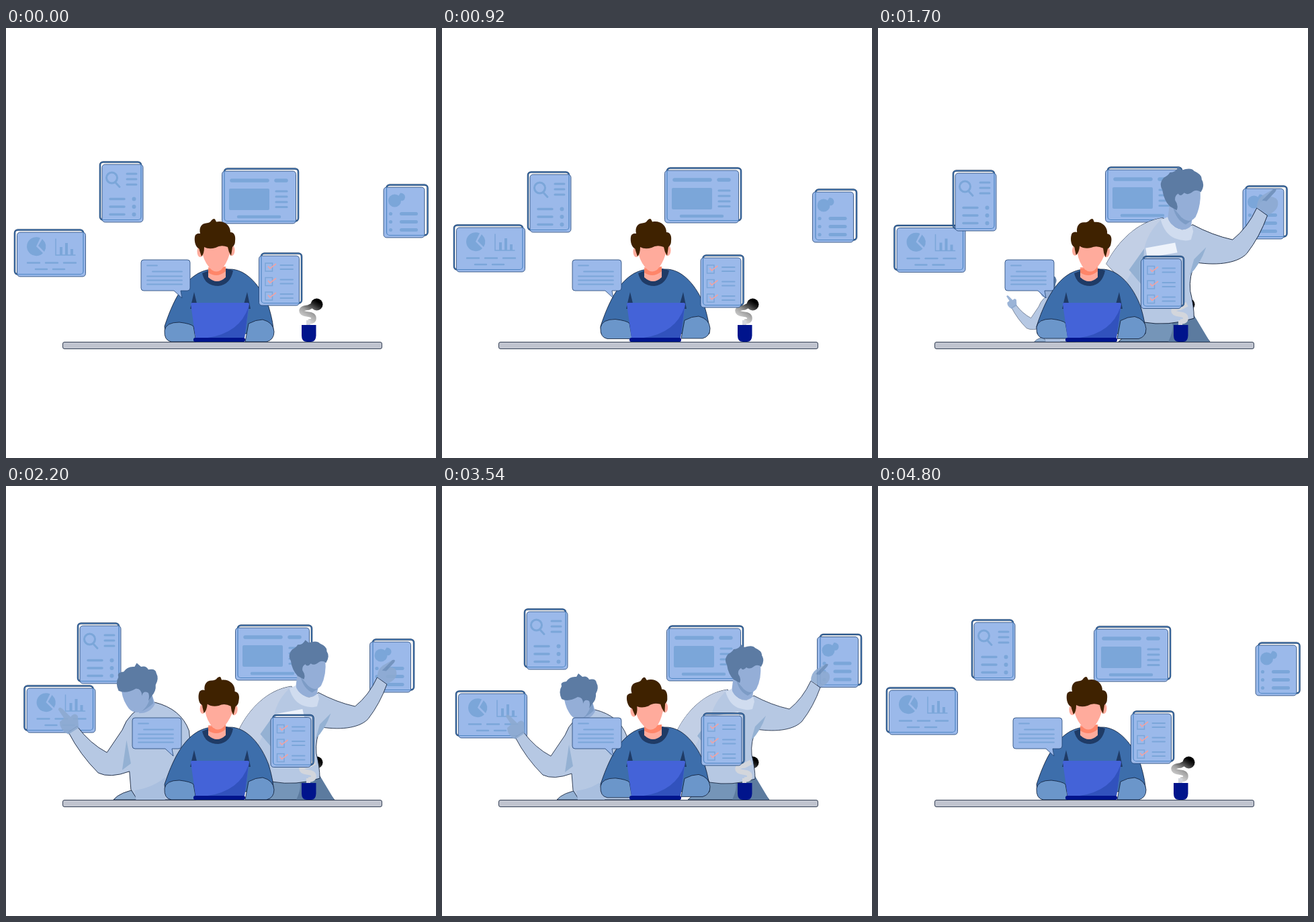
Animation, 640 px wide and 640 px high, one loop 4.84 s. Source, as an HTML page:

```html
<!DOCTYPE html>
<html lang="en">
<head>
<meta charset="utf-8">
<title>Multitasking at the desk</title>
<style>
  html, body { margin: 0; width: 100%; height: 100%; overflow: hidden; background: #fff; }
  svg { display: block; width: 100vw; height: 100vh; }
  .card { fill: #9bb9ea; stroke: #1f4273; stroke-width: .8; }
  .rim { fill: none; stroke: #10305a; stroke-width: 2.5; }
  .frame { fill: none; stroke: #4f86c4; stroke-width: 1.2; }
  .ink { fill: #7ba6d9; }
  .line { fill: none; stroke: #7ba6d9; stroke-linecap: round; }
  .tick { fill: none; stroke: #f0a3a4; stroke-width: 1.6; }
  .edge { stroke: #0c1a33; stroke-width: .8; }
  .hair { fill: #5c7ba3; }
  .face { fill: #94aed7; }
  .neck { fill: #7d9cc6; }
  .shirt { fill: #b6c8e3; }
  .pale { fill: #c2cfe5; }
  .fold { fill: #94b1d3; }
  .skin { fill: #ffab9c; }
  .arm { fill: #6b96ca; }
  .dark { fill: #1f3b66; }
  .navy { fill: #00148c; }
</style>
</head>
<body>
<svg viewBox="0 0 640 640">
  <defs>
    <linearGradient id="smoke" gradientUnits="userSpaceOnUse" x1="446" y1="440" x2="466" y2="408">
      <stop offset="0" stop-color="#e6e6e6"/>
      <stop offset=".45" stop-color="#a2a2a2"/>
      <stop offset=".85" stop-color="#222"/>
      <stop offset="1" stop-color="#000"/>
    </linearGradient>
    <path id="curl" d="M450 437Q458 437 458 432T449 426Q440 425 440 421T450 416L460 411" fill="none" stroke-width="7.5"/>
  </defs>

  <g id="backPanels"></g>

  <use href="#curl" stroke="url(#smoke)"/>
  <circle cx="462.5" cy="411.5" r="9" fill="url(#smoke)"/>

  <g id="rightHelper">
    <path class="edge" fill="#7595b8" d="M366 467L396 440H466L487 467Z"/>
    <path fill="#5c7b9f" d="M432 467Q440 450 437 442L466 432L487 467Z"/>
    <path class="shirt edge" d="M425 303C390 308 364 336 350 364L375 390L398 441Q432 447 466 436Q466 420 461 400Q459 380 468 362C500 367 525 362 536 350Q553 328 563 300L549 290Q537 316 517 332Q490 326 464 312Q444 330 425 303Z"/>
    <path class="pale" d="M425 303C390 308 364 336 350 364L375 390L400 345Q404 322 425 303Z"/>
    <path class="fold" d="M482 342L466 358L460 379Q474 365 482 342ZM400 344L380 372L397 392Z"/>
    <path class="face" d="M434 282L431 306Q446 326 462 315L464 300Z"/>
    <path class="neck" d="M438 288L449 302Q456 308 464 306L455 312Q442 306 438 288Z"/>
    <path fill="#d0dcef" d="M422 306Q427 324 440 330Q454 335 462 332L465 321L463 313Q454 322 443 317Q433 311 431 302Z"/>
    <path fill="#eef3fb" d="M402 343L441 336L444 349L404 356Z"/>
    <path class="face" d="M440 270Q452 262 474 265Q476 286 468 302Q460 312 449 302L437 288Z"/>
    <path class="hair" d="M434 288Q426 280 424 266Q419 258 426 250Q432 247 434 243Q442 243 445 236L450 240Q462 236 466 241Q477 246 476 252Q481 260 475 269Q470 265 465 268Q458 274 453 270Q448 276 445 271Q440 274 441 280Q446 287 443 293Z"/>
    <g opacity=".88">
      <path fill="#8daad1" d="M549 290Q549 279 557 273L571 265Q577 264 573 269L567 275Q577 276 577 283Q578 293 564 299Z"/>
      <path fill="#6f90ba" d="M556 280L571 265Q577 264 573 269L562 281Z"/>
    </g>
  </g>

  <g id="leftHelper">
    <path class="fold edge" d="M171 467Q180 456 206 452L240 450V467Z"/>
    <path class="shirt edge" d="M221 334Q192 345 183 371L162 402Q139 390 121 366L109 374Q125 405 150 430Q166 438 193 428L195 453L204 467H284L275 372Q264 342 228 333Z"/>
    <path fill="#a9bfdf" d="M202 467L200 454Q226 450 242 436V467Z"/>
    <path class="fold" d="M189 385L183 426L195 417ZM238 385L252 402L246 378Z"/>
    <path class="face" d="M213 318L224 322L228 335Q222 348 206 348Z"/>
    <path class="neck" d="M220 322L224 324L226 334Q218 342 208 346Q217 336 220 322Z"/>
    <path class="face" d="M181 308Q200 308 222 318Q222 336 209 346Q196 350 189 337Q182 326 181 308Z"/>
    <path class="hair" d="M178 317Q173 306 178 298Q175 292 185 291Q190 283 200 284L203 279L209 284Q216 282 219 288Q229 286 230 293Q234 300 229 309Q230 318 223 325L219 331Q221 324 219 320Q212 316 210 324Q210 314 202 314Q188 322 178 317Z"/>
    <path fill="#8daad1" opacity=".88" d="M109 377Q97 371 97 360L103 355L95 343Q96 338 101 342L112 353Q118 346 122 352L123 368Z"/>
  </g>

  <path class="edge" fill="#3d6eab" d="M300 360C272 366 252 395 236 444L237 455H398Q399 442 391 415C380 385 358 358 332 359Z"/>
  <path class="dark" d="M280 393L274 418H286ZM359 393L352 418H364ZM292 365Q296 384 316 384Q334 382 338 361L328 358L302 361Z"/>
  <path class="skin" d="M301 356V371Q314 383 327 371V356Z"/>
  <path fill="#ff8569" d="M301 358V364Q314 373 327 362V355Z"/>
  <g id="head">
    <ellipse class="skin" cx="289" cy="333" rx="4.500" ry="8"/>
    <ellipse class="skin" cx="336" cy="331" rx="4.500" ry="8"/>
    <path class="skin" d="M292 318H334L333 336Q328 352 320 360Q313 365 306 360Q296 350 293 338Z"/>
    <path fill="#3f2200" d="M291 340L288 331Q288 328 285 327C280 322 280 311 282 308Q285 305 289 306C287 297 291 291 298 290.500Q304 290 306 286Q309 283 311 284.500L313 288.500C324 286 334 293 334 304C340 304 342 310 341 317Q341 323 337 326L335 339Q331 333 330 326Q320 322 312 327Q302 330 295 326Q295 336 291 340Z"/>
  </g>
  <path id="leftArm" class="arm edge" d="M236 450Q238 438 258 438Q275 440 279 444L283 467H246Q235 465 236 450Z"/>
  <path id="rightArm" class="arm edge" d="M356 467L361 440Q372 434 382 434Q398 438 399 452Q399 464 388 467Z"/>
  <path fill="#4463d8" d="M277 409H360Q362 409 362 411L355 461H282L275 411Q275 409 277 409Z"/>
  <path fill="#3152bd" d="M361 415L355 461H300Q348 454 361 415Z"/>
  <rect class="navy" x="279" y="461" width="77" height="6" rx="2.500"/>
  <rect class="edge" x="84.500" y="467.500" width="475" height="10" rx="2.500" fill="#c0c4cf"/>
  <use id="paleCurl" href="#curl" stroke="#d3d6dc"/>
  <path d="M450 443V435" stroke="#d3d6dc" stroke-width="6"/>
  <path class="navy" d="M440 442H461.500V458Q461 467 454 467H448Q440 467 440 458Z"/>

  <g id="frontPanels"></g>
  <g id="bubble">
    <path class="card" d="M205 345H270Q274 345 274 349V387Q274 391 270 391H260L262 402L250 391H205Q201 391 201 387V349Q201 345 205 345Z"/>
    <path class="line" stroke-width="1.800" d="M210 353.500H225M218 362.500H262M210 369.500H262M210 375.500H262M210 381.500H262"/>
  </g>
</svg>
<script>
const $ = id => document.getElementById(id);
const LOOP = 4840, END = 4800;
const KEYS = [0, 920, 1700, 2200, 2940, 3540];

const lines = (width, d) => `<path class="line" stroke-width="${width}" d="${d}"/>`;
const dot = (x, y, r) => `<circle class="ink" cx="${x}" cy="${y}" r="${r}"/>`;
const shape = d => `<path class="ink" d="${d}"/>`;
const rows = (ys, draw) => ys.map(draw).join('');

// Card with a line frame shifted sideways by dx and up by 3.5
function panel(layer, id, x, y, w, h, dx, content) {
  const box = (cls, bx, by) => `<rect class="${cls}" x="${bx}" y="${by}" width="${w}" height="${h}" rx="4.500"/>`;
  const outline = cls => box(cls, x + dx, y - 3.5);
  $(layer).innerHTML += `<g id="${id}">${outline('rim')}${box('card', x, y)}${content}${outline('frame')}</g>`;
}

panel('backPanels', 'charts', 16.5, 304, 102, 66, -3.5,
  shape('M45 325L51 312.500A14 14 0 1 0 55 335ZM48 324L54 314Q63 323 57 333Z') +
  lines(1.5, 'M74 314V338H103') +
  shape('M80 326h4v12h-4zM88 320h4v18h-4zM96 329h4v9h-4z') +
  lines(2.4, 'M32 349.500H50M59 349.500H77M86 349.500H104M44 359H61M70 359H87'));

panel('backPanels', 'search', 143, 203, 61, 86, -3,
  lines(3, 'M163 230L169 236.500M165.500 223A8 8 0 1 0 149.500 223A8 8 0 1 0 165.500 223M180 217H194M180 225H194M180 233H194') +
  rows([254.5, 266, 277.5], y => lines(3.4, `M155 ${y}H176`) + dot(190.5, y, 3)));

panel('backPanels', 'browser', 321.5, 213, 110, 78, 3.5,
  lines(5.5, 'M336 227H389M402 227H417') + lines(4.5, 'M346 281H407') +
  shape('M334 239H390Q392 239 392 241V269Q392 271 390 271H334Q332 271 332 269V241Q332 239 334 239Z') +
  rows([243, 251, 259, 266.5], y => lines(3.2, `M402 ${y}H418`)));

panel('backPanels', 'report', 562, 237, 61, 75, 4.5,
  dot(578.5, 257, 9.5) + shape('M587 245.500Q594 246 594 252Q593 258 588 257L583 252Z') +
  rows([276.5, 288.5, 300.5], y => dot(572.5, y, 2.6) + lines(5, `M588.500 ${y}H610.500`)));

panel('frontPanels', 'tasks', 376.5, 339, 60, 74, 3.5,
  rows([350, 371.5, 393], y => lines(1.5, `M386 ${y}h10.500v12h-10.500z`) +
    `<path class="tick" d="M390 ${y + 4.5}l3 3.500l9-7"/>` +
    lines(2, `M408.500 ${y + 3}H427M408.500 ${y + 9}H427`)));

// Drift of each card from its resting place at the KEYS times
const drift = {
  charts:  [[0, 5, 11.5, 14.5, 13.5, 8], [0, -7, -6.5, -3, 3, 5]],
  search:  [[0, -12, -28, -33, -30, -17], [0, 15, 13, 5, -11, -16]],
  browser: [[0, 10, 17, 20, 18, 13], [0, -1, -2, -2, -2, -1]],
  report:  [[0, -10.5, -19, -20.5, -12, -3.5], [0, 7, 2, -5, -14.5, -12.5]],
  tasks:   [[0, 8.5, 15, 17.5, 15.5, 9.5], [0, 3, 4.5, 5.5, 4.5, 3]],
  bubble:  [[0, -7, -12, -13, -11.5, -7], [0, 0, 0, 0, 0, 0]]
};

// Smooth closed curve through the key values
function track(values, t) {
  const n = KEYS.length;
  const time = i => KEYS[(i + n) % n] + Math.floor(i / n) * END;
  const value = i => values[(i + n) % n];
  const slope = i => (value(i + 1) - value(i - 1)) / (time(i + 1) - time(i - 1));
  let i = n - 1;
  while (KEYS[i] > t) i--;
  const span = time(i + 1) - time(i), u = (t - time(i)) / span, v = 1 - u;
  return v * v * ((1 + 2 * u) * value(i) + u * span * slope(i)) +
         u * u * ((1 + 2 * v) * value(i + 1) - v * span * slope(i + 1));
}

const progress = (t, start, length) => Math.min(1, Math.max(0, (t - start) / length));
const backOut = u => 1 + 3 * (u - 1) ** 3 + 2 * (u - 1) ** 2;

function popScale(t, start, length, leave) {
  return t < leave ? backOut(progress(t, start, length)) : backOut(1 - progress(t, leave, 600));
}

function grow(id, x, scale) {
  $(id).style.display = scale > .001 ? '' : 'none';
  $(id).setAttribute('transform', `translate(${x} 467) scale(${scale}) translate(${-x} -467)`);
}

const lift = (id, amount) => $(id).setAttribute('transform', `translate(0 ${-5 * amount})`);

function draw(now) {
  const t = Math.min(now % LOOP, END - .01);
  for (const [id, [xs, ys]] of Object.entries(drift))
    $(id).setAttribute('transform', `translate(${track(xs, t)} ${track(ys, t)})`);

  const right = popScale(t, 1012, 1377, 4100);
  grow('rightHelper', 431, right);
  grow('leftHelper', 306, popScale(t, 1593, 820, 4000));
  $('paleCurl').style.display = right > .6 ? '' : 'none';

  const tilt = t < 920 ? 0 : 5.9 * Math.sin(2 * Math.PI * (t - 920) / (END - 920));
  $('head').setAttribute('transform', `rotate(${tilt} 314 378)`);

  const tap = beats => Math.sin(Math.PI * beats * t / END) ** 2;
  lift('leftArm', tap(24));
  lift('rightArm', tap(13));
  requestAnimationFrame(() => draw(performance.now() - begin));
}
const begin = performance.now();
draw(0);
</script>
</body>
</html>
```
